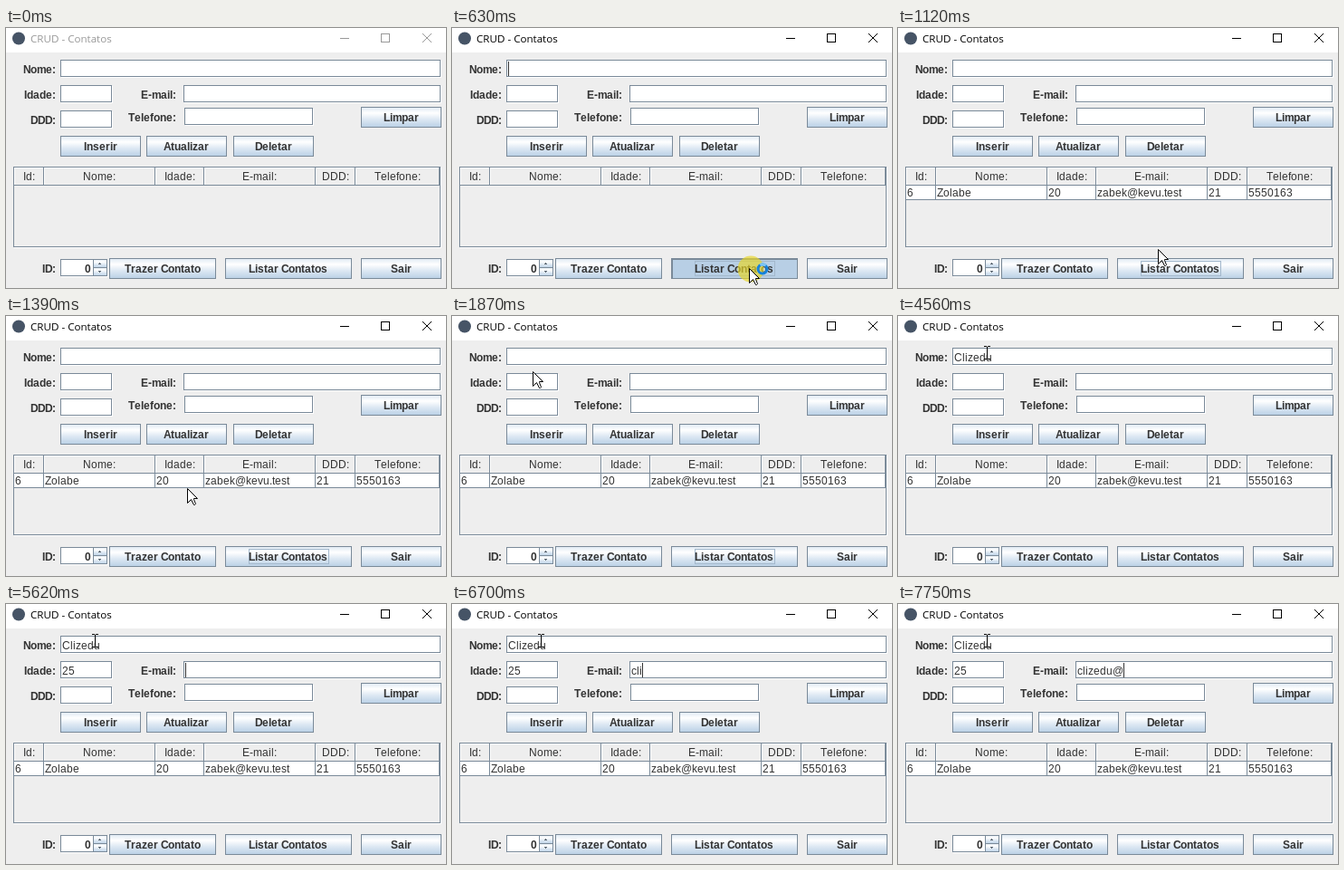
These frames come from a looping animation (486x287 px, 8 s). An HTML page with a canvas:

```html
<!DOCTYPE html>
<html lang="pt">
<head>
<meta charset="utf-8">
<title>CRUD - Contatos</title>
<style>
html, body { margin: 0; width: 100%; height: 100%; overflow: hidden; background: #eee; }
canvas { display: block; width: 486px; height: 287px; }
</style>
</head>
<body>
<canvas id="stage" width="486" height="287"></canvas>
<script>
const g = document.getElementById('stage').getContext('2d');
const LOOP = 8000, STEP = 69.2;
const EDGE = '#7a8a99', INK = '#333', PANEL = '#eee', PRESSED = '#b8cfe5';
const PLAIN = '12px "Liberation Sans", Arial, sans-serif';
const BOLD = 'bold ' + PLAIN;

// Typing schedule: time, field, text, caret visible
const TYPING = [
  [2220, 'name', '', 1], [2820, 'name', 'C', 1], [3020, 'name', 'Cl', 1],
  [3150, 'name', 'Cli', 1], [3280, 'name', 'Cliz', 1], [3610, 'name', 'Clize', 1],
  [3810, 'name', 'Clized', 1], [3910, 'name', 'Clizedu', 1],
  [4010, 'age', '', 1], [4560, 'age', '', 0], [5020, 'age', '', 1],
  [5350, 'age', '2', 1], [5550, 'age', '25', 1],
  [5620, 'mail', '', 1], [6150, 'mail', '', 0], [6350, 'mail', 'c', 1],
  [6480, 'mail', 'cl', 1], [6630, 'mail', 'cli', 1], [6730, 'mail', 'cliz', 1],
  [6830, 'mail', 'clize', 1], [6930, 'mail', 'clized', 1], [7030, 'mail', 'clizedu', 1],
  [7490, 'mail', 'clizedu', 0], [7750, 'mail', 'clizedu@', 1]
];
const FIELDS = {
  name: [60, 35, 421], age: [60, 63, 58], mail: [196, 63, 285],
  area: [60, 91, 58], phone: [197, 88, 143]
};
// Label: text, right edge, baseline
const LABELS = [
  ['Nome:', 55, 50], ['Idade:', 55, 78], ['DDD:', 55, 106],
  ['E-mail:', 188, 78], ['Telefone:', 188, 103], ['ID:', 55, 270]
];
const BUTTONS = [
  ['Inserir', 60, 119, 89], ['Atualizar', 155, 119, 89], ['Deletar', 251, 119, 89],
  ['Limpar', 392, 87, 89], ['Trazer Contato', 114, 254, 118], ['Sair', 392, 254, 89]
];
// Column: title, left, right, cell
const COLUMNS = [
  ['Id:', 9, 42, '6'], ['Nome:', 42, 165, 'Zolabe'], ['Idade:', 165, 219, '20'],
  ['E-mail:', 219, 342, 'zabek@kevu.test'], ['DDD:', 342, 386, '21'],
  ['Telefone:', 386, 479, '5550163']
];
// Pointer keys: time, x, y
const PATH = [
  [69, 296, 283], [140, 308, 276], [280, 324, 268], [420, 328, 265], [850, 328, 265],
  [1080, 296, 249], [1384, 200, 190], [1868, 89, 61], [1940, 70, 50],
  [2010, 64, 42], [2150, 98, 40]
];

function rect(x, y, w, h, color) {
  g.fillStyle = color;
  g.fillRect(x, y, w, h);
}

function frame(x, y, w, h, color) {
  g.strokeStyle = color;
  g.lineWidth = 1;
  g.strokeRect(x + 0.5, y + 0.5, w - 1, h - 1);
}

// Whole-pixel advances, as desktop toolkits lay out text; wide bold glyphs round down
function advance(ch, font) {
  const w = g.measureText(ch).width;
  return font === BOLD && w > 8 ? Math.floor(w) : Math.round(w);
}

function width(str, font) {
  g.font = font;
  return [...str].reduce((sum, ch) => sum + advance(ch, font), 0);
}

function text(str, x, y, font = PLAIN) {
  g.font = font;
  g.fillStyle = INK;
  for (const ch of str) {
    g.fillText(ch, x, y);
    x += advance(ch, font);
  }
}

function centered(str, x, w, y, font) {
  text(str, x + Math.floor((w - width(str, font)) / 2), y, font);
}

function flushBox(x, y, w, h, fill) {
  rect(x, y, w, h, PANEL);
  rect(x + 1, y + 1, w - 1, h - 1, '#fff');
  rect(x + 1, y + 1, w - 3, h - 3, fill);
  frame(x, y, w - 1, h - 1, EDGE);
}

function metal(x, y, w, h) {
  const fill = g.createLinearGradient(0, y, 0, y + h);
  fill.addColorStop(0, '#dde8f3');
  fill.addColorStop(0.3, '#fff');
  fill.addColorStop(0.6, '#dde8f3');
  fill.addColorStop(1, PRESSED);
  rect(x, y, w, h, fill);
  frame(x, y, w, h, EDGE);
}

function button(label, x, y, w, down, focused) {
  metal(x, y, w, 23);
  if (down) {
    rect(x, y, w, 23, EDGE);
    rect(x + 2, y + 2, w - 3, 20, PRESSED);
  }
  if (focused) frame(x + 26, y + 3, 89, 17, '#a3b8cc');
  centered(label, x, w, y + 16, BOLD);
}

function triangle(x, y, dir) {
  rect(x - 1, y, 3, 1, '#5a6570');
  rect(x, y + dir, 1, 1, '#5a6570');
}

function titleBar(active) {
  const color = active ? '#000' : '#999';
  rect(0, 0, 486, 27, '#fff');
  g.fillStyle = '#465466';
  g.beginPath();
  g.arc(14, 11.5, 7, 0, 7);
  g.fill();
  g.font = '11.6px "Open Sans", sans-serif';
  g.fillStyle = color;
  g.fillText('CRUD - Contatos', 27, 16);
  rect(369, 11, 10, 1, color);
  frame(414, 6, 10, 10, color);
  g.beginPath();
  g.moveTo(460, 6);
  g.lineTo(470, 16);
  g.moveTo(470, 6);
  g.lineTo(460, 16);
  g.stroke();
}

function spinner() {
  flushBox(60, 255, 53, 20, '#fff');
  metal(96, 255, 16, 10);
  metal(96, 264, 16, 10);
  triangle(103, 260, -1);
  triangle(103, 268, 1);
  text('0', 87, 270, BOLD);
}

function table(filled) {
  flushBox(8, 153, 473, 90, PANEL);
  for (const [title, left, right, cell] of COLUMNS) {
    const w = right - left;
    rect(left, 154, w, 1, '#fff');
    rect(left, 154, 1, 19, '#fff');
    rect(right - 1, 154, 1, 20, EDGE);
    rect(left, 173, w, 1, EDGE);
    centered(title, left, w, 168, PLAIN);
    if (!filled) continue;
    rect(left, 174, w - 1, 15, '#fff');
    rect(right - 1, 174, 1, 16, EDGE);
    rect(left, 189, w, 1, EDGE);
    text(cell, left + 1, 186);
  }
}

function pointerAt(t) {
  const next = PATH.findIndex(key => key[0] > t);
  if (next < 0) return PATH[PATH.length - 1].slice(1);
  const [t0, x0, y0] = PATH[next - 1], [t1, x1, y1] = PATH[next];
  const k = (t - t0) / (t1 - t0);
  return [Math.round(x0 + (x1 - x0) * k), Math.round(y0 + (y1 - y0) * k)];
}

function highlight(x, y) {
  g.fillStyle = 'rgba(232, 214, 40, 0.68)';
  g.beginPath();
  g.arc(x, y, 14.5, 0, 7);
  g.fill();
}

function arrow(x, y) {
  const shape = [[0, 0], [0, 16], [4, 12], [7, 18], [8, 18], [9, 17], [7, 12], [7, 11], [11, 11]];
  g.beginPath();
  shape.forEach(([dx, dy]) => g.lineTo(x + 0.5 + dx, y + 0.5 + dy));
  g.closePath();
  g.fillStyle = '#fff';
  g.fill();
  g.strokeStyle = '#000';
  g.lineWidth = 1;
  g.stroke();
}

function busyRing(x, y, t) {
  const turn = t / 150;
  g.lineWidth = 3;
  g.strokeStyle = '#1583dc';
  g.beginPath();
  g.arc(x, y, 5, 0, 7);
  g.stroke();
  g.strokeStyle = '#7cc4f5';
  g.beginPath();
  g.arc(x, y, 5, turn, turn + 1.3);
  g.stroke();
}

function beam(x, y) {
  rect(x, y - 6, 1, 13, '#000');
  for (const edge of [y - 7, y + 7]) {
    rect(x - 3, edge, 3, 1, '#000');
    rect(x + 1, edge, 3, 1, '#000');
  }
}

function draw(t) {
  const q = Math.floor(t / STEP) * STEP + 0.5;
  const active = t >= 560;
  const down = t >= 560 && t < 770;
  const picked = t >= 560 && t < 2220;

  rect(0, 0, 486, 287, PANEL);
  titleBar(active);
  for (const [x, y, w] of Object.values(FIELDS)) flushBox(x, y, w, 20, '#fff');
  for (const [label, right, y] of LABELS) text(label, right - width(label, BOLD), y, BOLD);
  for (const b of BUTTONS) button(...b);
  button('Listar Contatos', 242, 254, 140, down, picked);
  spinner();
  table(t >= 910);

  const done = TYPING.filter(key => key[0] <= t);
  const values = {};
  for (const [, id, value] of done) values[id] = value;
  for (const id in values) text(values[id], FIELDS[id][0] + 2, FIELDS[id][1] + 15);

  let caret = done[done.length - 1];
  if (t >= 560 && t < 700) caret = [0, 'name', '', 1];
  if (caret && caret[3]) {
    const [x, y] = FIELDS[caret[1]];
    rect(x + 2 + width(caret[2], PLAIN), y + 2, 1, 16, INK);
  }

  if (t < 70) return;
  const [x, y] = pointerAt(q);
  if (down || (t >= 2220 && t < 2360)) highlight(x + (down ? 2 : 0), y + 1);
  if (t >= 1985) beam(x, y);
  else arrow(x, y);
  if (t < 840) busyRing(x + 15, y + 1, q);
}

function tick() {
  draw(performance.now() % LOOP);
  requestAnimationFrame(tick);
}
tick();
</script>
</body>
</html>
```
